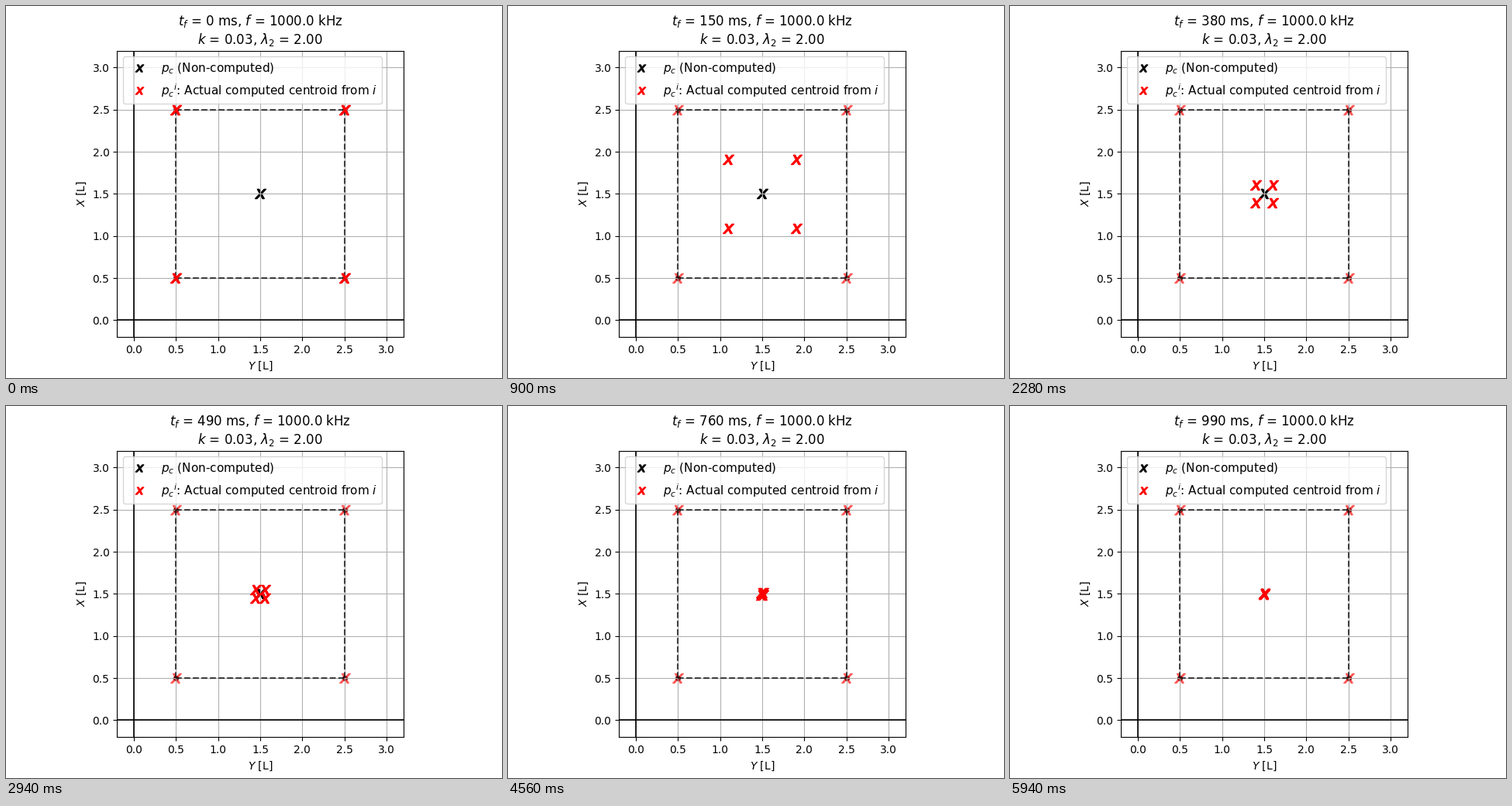
A matplotlib script that plays this animation: 640x480 px, repeating every 6000 ms.

```python
import numpy as np
import matplotlib.pyplot as plt
from matplotlib.animation import FuncAnimation
from matplotlib.lines import Line2D

FRAMES, INTERVAL = 100, 60
STEP_MS = 10
K, LAMBDA2 = 0.03, 2.0
CENTER = np.array([1.5, 1.5])
CORNERS = np.array([[0.5, 0.5], [2.5, 0.5], [2.5, 2.5], [0.5, 2.5]])
CROSS = "$x$"

fig, ax = plt.subplots(figsize=(6.4, 4.8), dpi=100)
ax.set_aspect("equal")
ax.set_xlim(-0.2, 3.2)
ax.set_ylim(-0.2, 3.2)
ticks = np.arange(0, 3.1, 0.5)
ax.set_xticks(ticks)
ax.set_yticks(ticks)
ax.set_xlabel("$Y$ [L]")
ax.set_ylabel("$X$ [L]")
ax.grid(True)
ax.axhline(0, color="black", lw=1.2)
ax.axvline(0, color="black", lw=1.2)

# Static markers stay under the grid and the edges
ax.scatter(*CORNERS.T, s=16, color="black", zorder=1)
ax.scatter(*CORNERS.T, s=100, marker=CROSS, color="red", alpha=0.5, zorder=1)
ax.scatter(*CENTER, s=100, marker=CROSS, color="black", zorder=1)

for a, b in zip(CORNERS, np.roll(CORNERS, -1, axis=0)):
    ax.plot(*np.sort([a, b], axis=0).T, "--", color="black", lw=1.5, alpha=0.7)

estimates = ax.scatter(*CORNERS.T, s=100, marker=CROSS, color="red", zorder=3)


def key(color, label):
    return Line2D([], [], ls="none", marker=CROSS, ms=7.5, color=color, label=label)


ax.legend(
    handles=[
        key("black", "$p_c$ (Non-computed)"),
        key("red", "${p_c}^i$: Actual computed centroid from $i$"),
    ],
    loc="upper left",
    fontsize=11,
)
title = ax.set_title("")


def update(n):
    decay = np.exp(-K * LAMBDA2 * n)
    estimates.set_offsets(CENTER + (CORNERS - CENTER) * decay)
    title.set_text(
        f"$t_f$ = {n * STEP_MS} ms, $f$ = 1000.0 kHz\n"
        f"$k$ = {K:.2f}, $\\lambda_2$ = {LAMBDA2:.2f}"
    )
    return estimates, title


anim = FuncAnimation(fig, update, frames=FRAMES, interval=INTERVAL, repeat=True)
plt.show()
```
